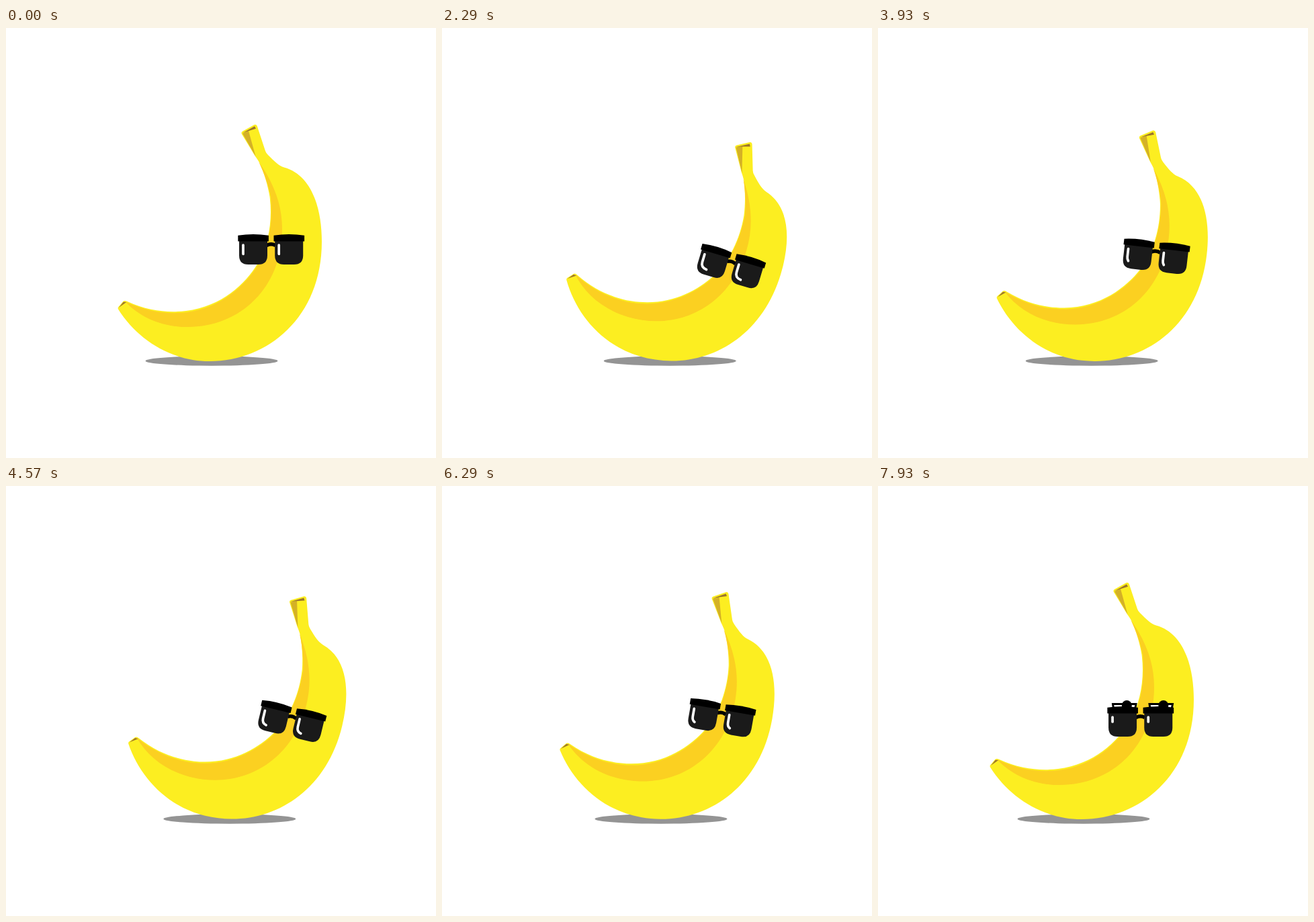
Recreate the animation shown at these times as an HTML page. Size 640x640 px, loop 8 s.

```html
<!DOCTYPE html>
<html lang="en">
<head>
<meta charset="utf-8">
<title>Rocking banana</title>
<style>
  html, body { margin: 0; width: 100%; height: 100%; overflow: hidden; background: #fff; }
  svg { display: block; width: 100%; height: 100%; }
</style>
</head>
<body>
<svg viewBox="0 0 640 640">
  <defs>
    <g id="eye">
      <path d="M349.5 324.4H384Q382 342 366.5 342Q351 342 349.5 324.4Z" fill="#fff" stroke="#000" stroke-width="3"/>
      <ellipse cx="370.3" cy="327" rx="7.5" ry="8"/>
    </g>
    <g id="lens">
      <path d="M347 315H389V338.5Q389 352 375.5 352H360.5Q347 352 347 338.5Z" fill="#1a1a1a"/>
      <path d="M345.3 317.6V308.8Q368 305.2 390.9 308.8V317.6Z"/>
      <path class="glint" d="M353 323V335Q353 344 364 344" fill="none" stroke="#fff" stroke-width="3.7" stroke-linecap="round"/>
    </g>
  </defs>
  <ellipse id="shadow" cy="495.5" rx="98.5" ry="7.2" fill="#949494"/>
  <g id="banana">
    <path fill="#fcee21" d="M167 418.5Q166 416.5 167.5 415L174.5 406.8Q176.5 405 180 406.8C213 422 243 424 268 421C322 414 356 381 375 350C391 322 397 286 392.5 251C390 235 384 215 377 200Q374 195 371 191L351 158Q349.5 155.5 352 153.8L369.5 144Q372.5 142.8 373.8 146L386 183Q387 186 390 189C400 199 406 205 414 207.5C455 219 470 268 470 318C470 430 390 496 303 496C245 496 195 463 167 418.5Z"/>
    <path fill="#fbd021" d="M177 407C213 424 245 426 270 423C322 416 358 381 376 351C393 322 397 286 394 251C391 235 384 215 376 199C398 230 411 262 411 300C411 385 350 445 270 445C232 445 200 431 177 407Z"/>
    <path fill="#d4b126" d="M352 157L361 153L371.5 191Z"/>
    <path fill="#9c752c" d="M352 156.3L370 146.3L372 149.8L361 153.2ZM168 416L174.8 407.8L179.3 408Z"/>
    <use href="#eye"/>
    <use href="#eye" x="54.5"/>
    <g id="glasses">
      <path d="M388 323.6Q394.5 320 401 323.6" fill="none" stroke="#000" stroke-width="5.4"/>
      <use href="#lens"/>
      <use href="#lens" x="53.2"/>
    </g>
  </g>
</svg>
<script>
  const LOOP = 8000;
  const el = id => document.getElementById(id);
  const shadow = el('shadow'), banana = el('banana'), glasses = el('glasses');
  const glint = document.querySelector('.glint');

  // time, tilt, body x, body y, shadow x
  const poses = [
    [0, 0, 0, 0, 0],
    [1780, 19.6, 46, 4.6, 39.3],
    [3520, 4.8, 16.8, 1.3, 8.7],
    [5400, 19.6, 46, 4.6, 39.3],
    [7200, 0, 0, 0, 0]
  ];

  function ease(t, from, to) {
    const u = Math.min(1, Math.max(0, (t - from) / (to - from)));
    return (1 - Math.cos(Math.PI * u)) / 2;
  }

  function poseAt(t) {
    let i = 0;
    while (i < poses.length - 2 && t >= poses[i + 1][0]) i++;
    const a = poses[i], b = poses[i + 1], k = ease(t, a[0], b[0]);
    return a.map((v, n) => v + (b[n] - v) * k);
  }

  function draw(t) {
    const [, tilt, x, y, shade] = poseAt(t);
    const slip = ease(t, 7200, 8150);
    shadow.setAttribute('cx', 306 + shade);
    banana.setAttribute('transform', `translate(${x} ${y}) rotate(${tilt} 318 320)`);
    glasses.setAttribute('transform', `translate(${-4.5 * slip} ${24 * slip})`);
    glint.setAttribute('stroke-dasharray', `${13.3 + 0.78 * tilt - 7.2 * slip} 100`);
  }

  const start = performance.now();
  function tick() {
    draw((performance.now() - start) % LOOP);
    requestAnimationFrame(tick);
  }
  draw(0);
  requestAnimationFrame(tick);
</script>
</body>
</html>
```
